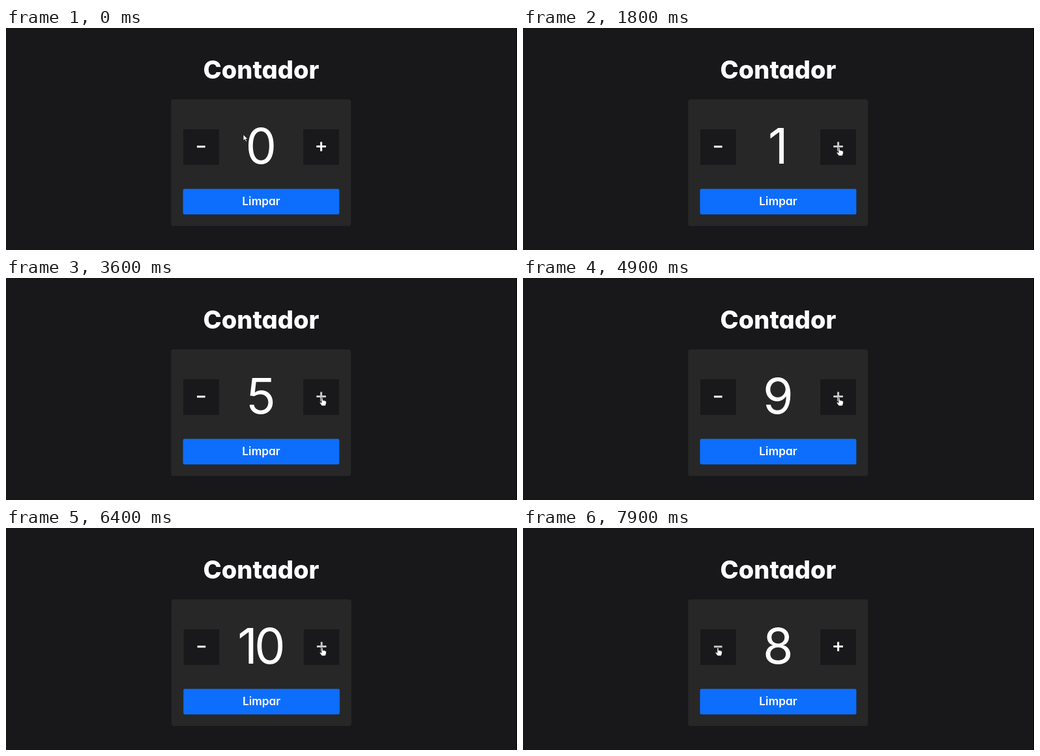
Animation, 784 px wide and 342 px high, one loop 8 s. Source, as an HTML page:

```html
<!DOCTYPE html>
<html lang="pt">
<head>
<meta charset="utf-8">
<title>Contador</title>
<style>
  html, body { margin: 0; width: 100%; height: 100%; overflow: hidden; background: #18181b; }
  svg { display: block; width: 100%; height: 100%; }
  text {
    fill: #fff;
    text-anchor: middle;
    font-family: Inter, "Open Sans", sans-serif;
    font-feature-settings: "cv11"; /* single-storey a */
  }
  .title { font-size: 38px; font-weight: 800; }
  .value { font-size: 75.5px; font-weight: 400; letter-spacing: -5px; }
  .label { font-size: 17.3px; font-weight: 600; }
  .button { fill: #19191b; }
  .sign { stroke: #fff; stroke-width: 3; fill: none; }
  .sign.hover { stroke: #c8c8c8; }
  .clear { fill: #0d6efd; stroke: #0d6efd; stroke-opacity: .4; }
  .clear.hover { fill: #0b5ed7; }
  .cursor { fill: #fff; stroke: #151515; stroke-width: .8; stroke-linejoin: round; }
</style>
</head>
<body>
<svg viewBox="0 0 784 342">
  <path d="M783.5 0V342" stroke="#000"/>
  <text class="title" x="391.5" y="78">Contador</text>
  <g id="card">
    <rect x="253.3" y="110" width="276" height="195" rx="4" fill="#272727"/>
    <rect class="button" x="272" y="156" width="54.7" height="55" rx="1"/>
    <rect class="button" x="456.2" y="156" width="54.7" height="55" rx="1"/>
    <path id="minus" class="sign" d="M293 182.8h12.6"/>
    <path id="plus" class="sign" d="M476.3 182.6h14.6M483.6 175.4v14.4"/>
    <text id="value" class="value" x="388.8" y="209">0</text>
    <rect id="clear" class="clear" x="271.8" y="248" width="239.4" height="39" rx="2"/>
    <text class="label" x="391.5" y="273.3">Limpar</text>
  </g>
  <path id="arrow" class="cursor" d="M0 0V9.6L2.3 7.6L4 11.3L5.6 10.6L4 7.1H7Z"/>
  <path id="hand" class="cursor" d="M-1.6 .8Q-.5 -.5 .6 .8V4.4Q1.7 3.7 2.4 4.8Q3.5 4.2 4.1 5.3Q5.6 4.9 5.9 6.3V9Q5.5 11 4.5 13H-1Q-2.5 11 -4.2 8.4Q-4.5 6.6 -2.9 7.1L-1.6 8.4Z"/>
</svg>
<script>
const LOOP = 8000;
const LIMIT = 10;
const SHAKE = { start: 5560, end: 6100 };
const $ = id => document.getElementById(id);

const spots = {
  rest: { x: 364, y: 164 },
  plus: { x: 485.5, y: 184 },
  clear: { x: 470, y: 262 },
  minus: { x: 299.5, y: 184 }
};
const moves = [
  { start: 250, end: 600, to: spots.plus },
  { start: 880, end: 1150, to: spots.clear },
  { start: 1300, end: 1600, to: spots.plus },
  { start: 6750, end: 7400, to: spots.minus }
];

const progress = (t, start, end) => Math.min(1, Math.max(0, (t - start) / (end - start)));

function cursorAt(t) {
  let { x, y } = spots.rest;
  for (const { start, end, to } of moves) {
    const p = progress(t, start, end);
    const eased = p * p * (3 - 2 * p);
    x += (to.x - x) * eased;
    y += (to.y - y) * eased;
  }
  // The sweep between the two buttons sags slightly
  const sweep = progress(t, 6750, 7400);
  return { x, y: y + 9 * Math.sin(Math.PI * sweep) };
}

// Steady clicking after a hesitant start
const plusClick = n => 1906 + 324 * n - 220 * Math.max(0, 3 - n);

function valueAt(t) {
  let value = 0;
  while (value < LIMIT && t >= plusClick(value + 1)) value++;
  const minusClicks = Math.max(0, 1 + Math.floor((t - 7650) / 200));
  return value - minusClicks;
}

// The card shakes when the limit is exceeded, and rests a little off centre
function shiftAt(t, value) {
  if (t > SHAKE.end) return value === LIMIT ? .6 : 0;
  const envelope = Math.sin(Math.PI * progress(t, SHAKE.start, SHAKE.end));
  return -2.7 * envelope * Math.sin(Math.PI * (t - 5640) / 100);
}

const inside = ({ x, y }, left, top, width, height) =>
  x >= left && x <= left + width && y >= top && y <= top + height;

function draw(t) {
  const cursor = cursorAt(t);
  const value = valueAt(t);
  const hovers = {
    minus: inside(cursor, 272, 156, 55, 55),
    plus: inside(cursor, 456, 156, 55, 55),
    clear: inside(cursor, 272, 248, 239, 39)
  };
  const pointing = Object.values(hovers).some(Boolean);

  $("card").setAttribute("transform", `translate(${shiftAt(t, value)} 0)`);
  $("value").textContent = value;
  for (const id in hovers) $(id).classList.toggle("hover", hovers[id]);
  for (const [id, shown] of [["hand", pointing], ["arrow", !pointing]]) {
    $(id).style.display = shown ? "" : "none";
    $(id).setAttribute("transform", `translate(${cursor.x} ${cursor.y})`);
  }
}

let start;
function frame(now) {
  start ??= now;
  draw((now - start) % LOOP);
  requestAnimationFrame(frame);
}
draw(0);
requestAnimationFrame(frame);
</script>
</body>
</html>
```
